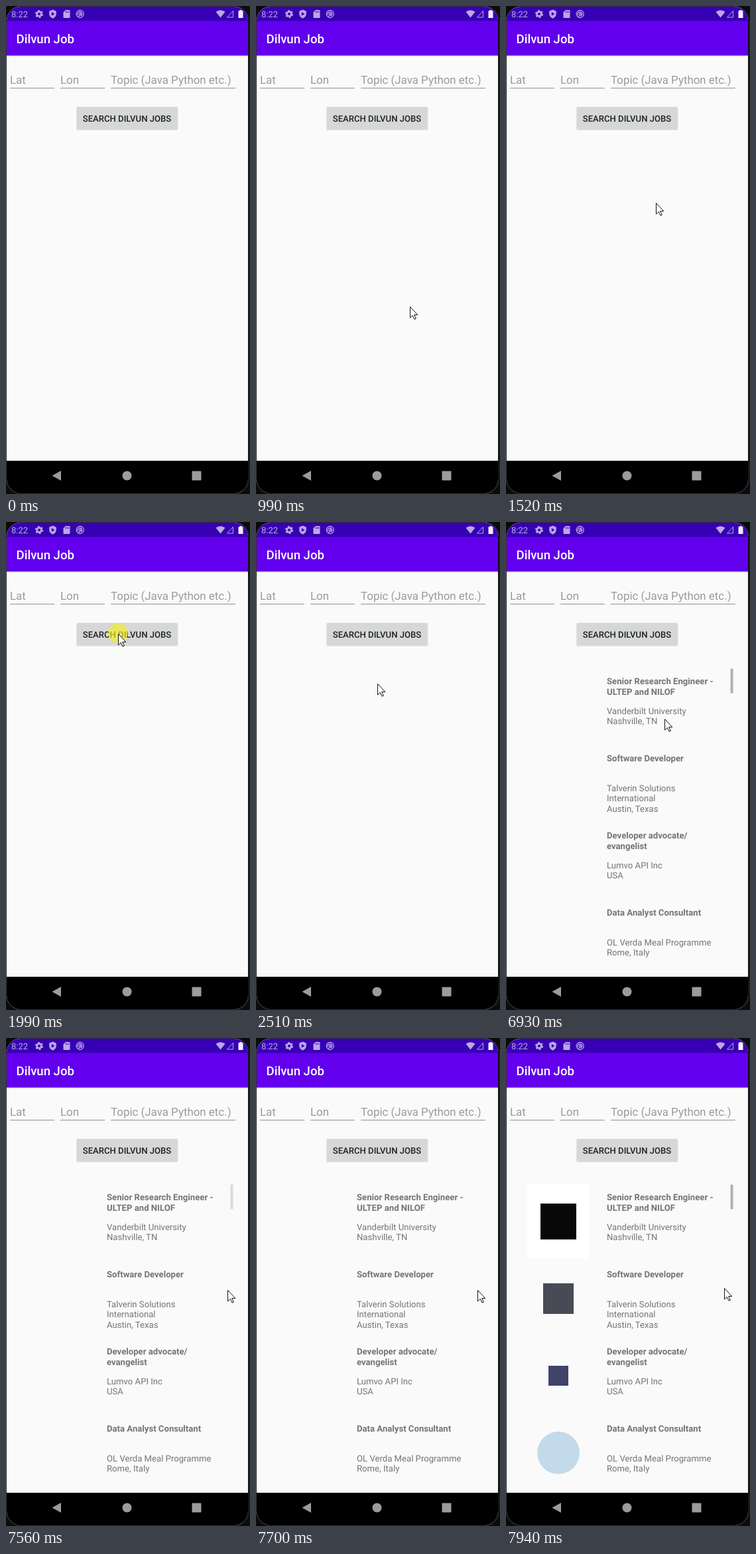
Recreate the animation shown at these times as an HTML page. Size 368 by 734 pixels, loop 8000 ms.

```html
<!DOCTYPE html>
<html lang="en">
<head>
<meta charset="utf-8">
<title>Job search</title>
<style>
  html, body { margin: 0; width: 100%; height: 100%; overflow: hidden; background: #0b0b0c; }
  svg { display: block; width: 368px; height: 734px; font-family: Roboto, sans-serif; text-rendering: geometricPrecision; }
  .status { fill: #bba7e7; }
  .line { fill: none; stroke: #bba7e7; }
  .hint { font-size: 16.9px; fill: #9b9b9b; }
  .row { font-size: 13.15px; fill: #757575; }
  .title { font-weight: 700; }
  .hidden { opacity: 0; }
</style>
</head>
<body>
<svg viewBox="0 0 368 734">
  <defs>
    <clipPath id="screen"><rect x="1" y="1" width="364" height="732" rx="21"/></clipPath>
  </defs>
  <rect x=".5" y=".5" width="366" height="733" rx="22" stroke="#303032"/>
  <g clip-path="url(#screen)">
    <rect width="368" height="734" fill="#fafafa"/>
    <rect y="74" width="368" height="2" opacity=".1"/>
    <rect y="22" width="368" height="52.5" fill="#6200ee"/>
    <rect width="368" height="22.5" fill="#3700b3"/>
    <rect y="684" width="368" height="50"/>
  </g>

  <g class="status">
    <text x="8" y="17" font-size="13">8:22</text>
    <g class="line">
      <circle cx="50" cy="12" r="3.4" stroke-width="2.6"/>
      <circle cx="50" cy="12" r="5.2" stroke-width="1.8" stroke-dasharray="2.8 2.645"/>
    </g>
    <path d="M70.5 5.5l5.3 2.3v4c0 3.3-2.2 5.8-5.3 6.9c-3.1-1.1-5.3-3.6-5.3-6.9v-4z"/>
    <path d="M68.8 9l4.6 2.9l-4.6 2.9z" fill="#3700b3"/>
    <path d="M90 6h5.5q1 0 1 1v10q0 1-1 1h-8q-1 0-1-1v-7.5z"/>
    <path d="M90.2 7.800v2.300M92.300 7.800v2.300M94.400 7.800v2.300" stroke="#3700b3"/>
    <g class="line" stroke-width="1.3">
      <circle cx="111.700" cy="12" r="5.500"/>
      <path d="M108.700 13.700a3.200 3.200 0 1 1 4 1.300M109.300 16l2.500-2.500"/>
      <circle cx="112" cy="12" r="1.300"/>
    </g>
    <path d="M316.500 8.700q7-5 14 0l-7 8.800z"/>
    <path class="line" d="M333.500 17l9-9.500v9.500z"/>
    <path d="M352.500 6h3v1.300h2v10.700h-7v-10.700h2z" fill="#f1edfa"/>
  </g>

  <text x="15.500" y="56" font-size="18.570" font-weight="500" fill="#fff">Dilvun Job</text>

  <g class="hint">
    <text x="6" y="117">Lat</text>
    <text x="82" y="117">Lon</text>
    <text x="158" y="117">Topic (Java Python etc.)</text>
  </g>
  <path d="M6 123.500h67M82 123.500h67M158 123.500h188" stroke="#929292"/>

  <rect x="106" y="151.500" width="153.500" height="35.500" rx="2.500" opacity=".1"/>
  <rect x="107" y="152" width="151.500" height="33.500" rx="2" fill="#d6d7d7"/>
  <rect id="ripple" class="hidden" x="107" y="152" width="151.500" height="33.500" rx="2"/>
  <text x="182.500" y="173.700" font-size="13.100" font-weight="500" text-anchor="middle" fill="#202020">SEARCH DILVUN JOBS</text>

  <g id="list" class="row hidden"></g>
  <g id="logos"></g>
  <rect id="scrollbar" class="hidden" x="338.500" y="220.500" width="4" height="37" fill="#b1b1b1"/>

  <g fill="#9c9c9c">
    <path d="M69.500 706.500l13.500-7.500v15z"/>
    <circle cx="182.500" cy="706.500" r="7"/>
    <rect x="280.500" y="699.500" width="14" height="14" rx="1"/>
  </g>

  <circle id="press" class="hidden" cx="169" cy="167" r="15" fill="#f2ef20" fill-opacity=".65"/>
  <path id="cursor" class="hidden" d="M.5.5v16.500l3.800-3.600l2.700 5.800l2.300-1l-2.600-5.700h5.100z" fill="#fff" stroke="#111"/>
</svg>

<script>
const LOOP = 8000;
const ROW_HEIGHT = 116;
const $ = id => document.getElementById(id);

function add(parent, tag, attrs, text = "") {
  const el = document.createElementNS("http://www.w3.org/2000/svg", tag);
  for (const name in attrs) el.setAttribute(name, attrs[name]);
  el.textContent = text;
  parent.append(el);
  return el;
}

const key = (ms, props, easing = "step-end") => ({ offset: ms / LOOP, easing, ...props });
const play = (el, keys) => el.animate(keys, { duration: LOOP, iterations: Infinity });
const show = (el, from, until = LOOP) => play(el, [
  key(0, { opacity: 0 }), key(from, { opacity: 1 }),
  key(until, { opacity: until < LOOP ? 0 : 1 }), key(LOOP, { opacity: until < LOOP ? 0 : 1 })
]);

const jobs = [
  { title: ["Senior Research Engineer -", "ULTEP and NILOF"], info: ["Vanderbilt University", "Nashville, TN"], logo: "#080808", size: 54 },
  { title: ["Software Developer"], info: ["Talverin Solutions", "International", "Austin, Texas"], logo: "#484b55", size: 46 },
  { title: ["Developer advocate/", "evangelist"], info: ["Lumvo API Inc", "USA"], logo: "#414468", size: 30 },
  { title: ["Data Analyst Consultant"], info: ["OL Verda Meal Programme", "Rome, Italy"], logo: "#c3daeb", size: 64, round: true }
];

jobs.forEach(({ title, info, logo, size, round }, row) => {
  const top = row * ROW_HEIGHT;
  const write = (lines, y, cls) => lines.forEach((line, i) =>
    add($("list"), "text", { x: 152, y: y + i * 15.5, class: cls }, line));
  write(title, 244 + top, "title");
  write(info, 288.5 + top, "info");

  const group = add($("logos"), "g", {});
  if (row === 0) add(group, "rect", { x: 32, y: 220.5, width: 93, height: 111, fill: "#fff" });
  add(group, "rect", {
    x: 79 - size / 2, y: 276 + top - size / 2, width: size, height: size,
    rx: round ? size / 2 : 0, fill: logo
  });
  show(group, 7710 + row * 50);
});

const linear = u => u;
const easeOut = u => 1 - (1 - u) ** 2;
const smooth = u => u * u * (3 - 2 * u);

// Each stroke starts where the previous one ended; bend is an optional curve control point.
const strokes = [
  { start: 760, end: 1150, steps: 6, from: [326, 692], bend: [198, 494], to: [240, 328], ease: easeOut },
  { start: 1380, end: 1820, steps: 7, to: [169, 168], ease: smooth },
  { start: 2140, end: 2510, steps: 6, to: [183, 243], ease: smooth },
  { start: 6630, end: 7250, steps: 9, to: [318, 371], ease: smooth },
  { start: 7420, end: 7560, steps: 3, to: [334, 379], ease: linear },
  { start: 7710, end: 7940, steps: 4, to: [329, 376], ease: linear }
];

function cursorKeys() {
  const at = (ms, [x, y]) => key(ms, { transform: `translate(${x}px, ${y}px)` });
  let pos = strokes[0].from;
  const keys = [at(0, pos)];
  for (const { start, end, steps, from, bend, to, ease } of strokes) {
    const origin = pos;
    const control = bend || origin.map((v, axis) => (v + to[axis]) / 2);
    for (let i = 0; i < steps; i++) {
      const p = ease(from ? i / (steps - 1) : (i + 1) / steps);
      pos = origin.map((v, axis) =>
        Math.round((1 - p) ** 2 * v + 2 * p * (1 - p) * control[axis] + p * p * to[axis]));
      keys.push(at(start + (end - start) * i / (steps - 1), pos));
    }
  }
  return [...keys, at(LOOP, pos)];
}

play($("cursor"), cursorKeys());
show($("cursor"), 760);
show($("press"), 1990, 2140);
show($("list"), 6010);
play($("ripple"), [
  key(0, { opacity: 0 }), key(2070, { opacity: .1 }, "linear"),
  key(2440, { opacity: 0 }), key(LOOP, { opacity: 0 })
]);
play($("scrollbar"), [
  key(0, { opacity: 0 }), key(6010, { opacity: 1 }), key(7420, { opacity: 1 }, "linear"),
  key(7670, { opacity: 0 }), key(7710, { opacity: 1 }), key(LOOP, { opacity: 1 })
]);
</script>
</body>
</html>
```
